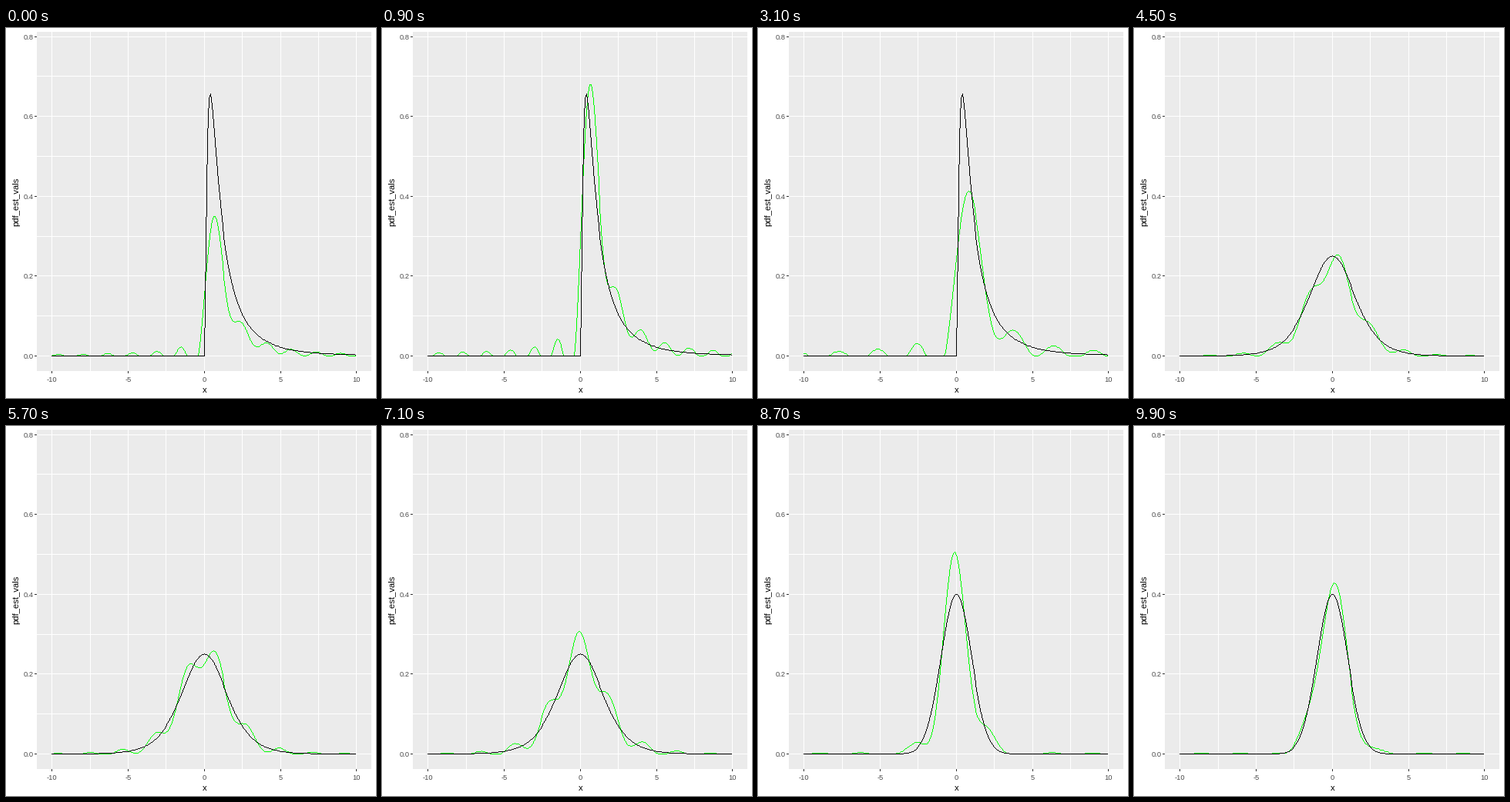
These frames come from a looping animation (480x480 px, 10 s). A matplotlib script:

```python
import numpy as np
import matplotlib.pyplot as plt
from matplotlib.animation import FuncAnimation

SIZE, DPI = 480, 72
X0, Y0 = 257.33, 425.5         # pixel position of the data origin
SX, SY = 19.74, 518.1          # pixels per data unit
LEFT, RIGHT, TOP, BOTTOM = 40, 474, 5, 445
WHITE, PANEL, TICK, GREEN, BLACK = 255, 235, 51, (0, 255, 0), 0

plt.rcParams["font.family"] = "Liberation Sans"

xs = np.linspace(-10, 10, 201)
us = np.arange(-20, 40, 0.05)  # integration grid


def lognormal(x):
    safe = np.where(x > 0, x, 1)
    pdf = np.exp(-np.log(safe) ** 2 / 2) / (safe * np.sqrt(2 * np.pi))
    return np.where(x > 0, pdf, 0)


def logistic(x):
    return 0.25 / np.cosh(x / 2) ** 2


def normal(x):
    return np.exp(-x * x / 2) / np.sqrt(2 * np.pi)


# (end tick, density, [(tick, cutoff frequency, peak, noise, noise shift), ...])
PHASES = [
    (39, lognormal, [(0, 3.9, 0.35, 0, 0), (11, 4.2, 0.772, 0, 0),
                     (17, 2.95, 0.548, 0, 0), (31, 2.44, 0.413, 0, 0)]),
    (79, logistic, [(45, 2.92, 0.253, 0.03, 0.5),
                    (71, 2.9, 0.307, 0.04, -0.1)]),
    (100, normal, [(87, 2.3, 0.505, 0.11, -0.2),
                   (99, 2.4, 0.428, 0.045, 0.35)]),
]


def col(x):
    return np.floor(X0 + SX * np.asarray(x)).astype(int)


def row(y):
    return np.floor(Y0 - SY * np.asarray(y)).astype(int)


def estimate(tick, density, keys):
    """Sinc-kernel density estimate with sampling noise, cut at zero."""
    ticks, *params = np.array(keys, float).T
    cutoff, peak, noise, shift = (np.interp(tick, ticks, p) for p in params)

    # samples vary more the further they are from a key tick
    rng = np.random.default_rng(tick)
    slack = min(1, np.abs(ticks - tick).min() / 4)
    cutoff *= 1 + slack * rng.normal(0, 0.08)
    peak *= 1 - slack * rng.uniform(0, 0.15)
    shift += slack * rng.normal(0, 0.4)

    kernel = cutoff / np.pi * np.sinc(cutoff * (xs[:, None] - us) / np.pi)
    est = kernel @ density(us) * (us[1] - us[0])
    pdf = density(xs)
    est += noise * np.cos(cutoff * (xs - shift)) * (pdf / pdf.max()) ** 0.4
    return np.maximum(est * peak / est.max(), 0)


def trace(canvas, ys, color):
    """Plot a hard one-pixel polyline."""
    c, r = col(xs), row(ys)
    for x, y, dx, dy in zip(c, r, np.diff(c), np.diff(r)):
        n = max(abs(dx), abs(dy))
        t = np.arange(n) / n
        canvas[np.rint(y + t * dy).astype(int),
               np.rint(x + t * dx).astype(int)] = color


def label(x, y, text, size=9.2, color="#4D4D4D", **kw):
    ax.text(x, y, text, fontsize=size, color=color, va="baseline", **kw)


fig = plt.figure(figsize=(SIZE / DPI, SIZE / DPI), dpi=DPI, facecolor="white")
ax = fig.add_axes([0, 0, 1, 1])
ax.axis("off")

backdrop = np.full((SIZE, SIZE, 3), WHITE, np.uint8)
backdrop[TOP:BOTTOM, LEFT:RIGHT] = PANEL
backdrop[TOP:BOTTOM, col(np.arange(-10, 11, 2.5))] = WHITE
backdrop[row(np.arange(9) / 10), LEFT:RIGHT] = WHITE
for v in range(-10, 11, 5):
    backdrop[BOTTOM:BOTTOM + 3, col(v)] = TICK
    label(col(v), 458.5, str(v), ha="center")
for v in np.arange(0, 9, 2) / 10:
    backdrop[row(v), LEFT - 3:LEFT] = TICK
    label(35, row(v) + 3.3, f"{v:.1f}", ha="right")
label(col(0), 472.5, "x", 11.3, "black", ha="center")
label(15.5, 224.7, "pdf_est_vals", 11.2, "black", ha="center", rotation=90,
      rotation_mode="anchor")
image = ax.imshow(backdrop, interpolation="nearest", aspect="auto")


def draw(tick):
    start = tick - 1 if tick and tick % 2 == 0 else tick  # held for two ticks
    _, density, keys = next(p for p in PHASES if start < p[0])
    canvas = backdrop.copy()
    trace(canvas, estimate(start, density, keys), GREEN)
    trace(canvas, density(xs), BLACK)
    image.set_data(canvas)
    return image,


anim = FuncAnimation(fig, draw, frames=100, interval=100, repeat=True)
plt.show()
```
